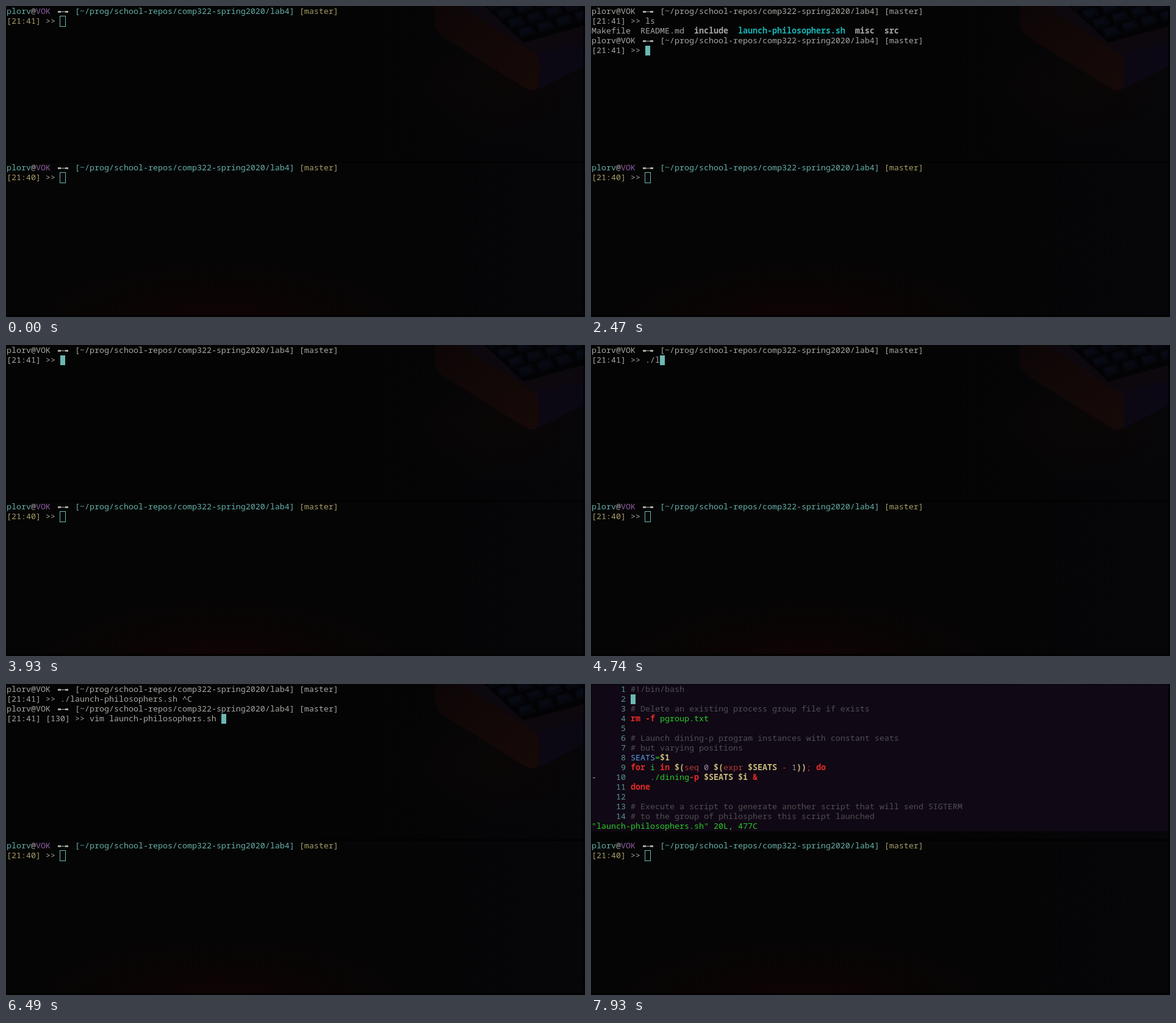
An HTML page that plays this animation: 949 px wide and 509 px high, repeating every 8 s.

```html
<!DOCTYPE html>
<html lang="en">
<head>
<meta charset="utf-8">
<title>Terminal session</title>
<style>
html, body { margin: 0; width: 949px; height: 509px; overflow: hidden; background: #040404; }
svg { display: block; }
text { font: 300 13.333px "Noto Sans Mono", "Liberation Mono", monospace; white-space: pre; }
.b { font-weight: 700; }
</style>
</head>
<body>
<svg width="949" height="509" viewBox="0 0 949 509">
  <defs>
    <radialGradient id="red"><stop stop-color="#110304"/><stop offset=".5" stop-color="#0b0404" stop-opacity=".6"/><stop offset="1" stop-color="#060505" stop-opacity="0"/></radialGradient>
    <radialGradient id="glow"><stop stop-color="#0a0606"/><stop offset="1" stop-color="#0a0606" stop-opacity="0"/></radialGradient>
    <linearGradient id="room"><stop offset=".5" stop-color="#050507" stop-opacity="0"/><stop offset="1" stop-color="#060609"/></linearGradient>
    <linearGradient id="side" x2="1" y2="1"><stop stop-color="#0d0606"/><stop offset="1" stop-color="#160a08"/></linearGradient>
    <linearGradient id="front"><stop stop-color="#0e0814"/><stop offset="1" stop-color="#0b0713"/></linearGradient>
  </defs>
  <rect width="949" height="509" fill="#040404"/>
  <rect y="256" width="949" height="249" fill="#050505"/>
  <rect width="949" height="509" fill="url(#room)"/>
  <ellipse cx="350" cy="520" rx="420" ry="140" fill="url(#red)"/>
  <ellipse cx="810" cy="130" rx="180" ry="100" fill="url(#glow)"/>
  <path d="M735 0H949V97L874 136L858 80Z" fill="url(#front)"/>
  <path d="M703 0H745L860 70Q875 80 874 100V128Q870 143 854 136L718 52Q703 42 703 26Z" fill="url(#side)"/>
  <path d="M745 0H949V58L866 78Z" fill="#0d080d"/>
  <path d="M784 0H949V32L848 60Z" fill="#030305"/>
  <g id="keys"></g>
  <path d="M0 255.5H949M0 507H949M947.5 0V509" stroke="#010101" stroke-width="2"/>
  <g id="top"></g>
  <g id="bottom"></g>
</svg>
<script>
const LOOP = 8000, CELL = 8, ROW = 16;
const GREY = '#a6a6a2', TEAL = '#66afa8', PURPLE = '#8c5ca2', OLIVE = '#a69d68',
  CYAN = '#18b2b2', GREEN = '#28cc28', RED = '#e32b26', KHAKI = '#c9bb79',
  DIM = '#514e53', NUM = '#5a9494', BLUE = '#5c9ee6', CURSOR = '#6cb8b2',
  DARKRED = '#b33a35', MAUVE = '#a08aa0';
const USER = 'plorv', HOST = 'VOK', FILE = 'launch-philosophers.sh';
const PATH = '[~/prog/school-repos/comp322-spring2020/lab4]';

const $ = id => document.getElementById(id);
const esc = s => s.replace(/&/g, '&amp;').replace(/</g, '&lt;').replace(/>/g, '&gt;');
const box = (x, y, w, h, fill) => `<rect x="${x}" y="${y}" width="${w}" height="${h}" fill="${fill}"/>`;

// A line is a string or a list of [text, colour, bold] parts.
function line(parts, row, top = 1) {
  if (typeof parts === 'string') parts = [[parts, GREY]];
  const spans = parts.map(([s, c, b]) =>
    `<tspan fill="${c}"${b ? ' class="b"' : ''}>${esc(s)}</tspan>`).join('');
  return `<text x="1" y="${top + row * ROW + 12}">${spans}</text>`;
}

function prompt(row, top, colored) {
  const y = top + row * ROW + 8, pick = c => colored ? c : GREY;
  return line([[USER, pick(TEAL)], ['@', GREY], [HOST, pick(PURPLE)], ['     ', GREY],
    [PATH, pick(TEAL)], [' ', GREY], ['[master]', pick(OLIVE)]], row, top) +
    box(85, y - 1, 5, 3, GREY) + box(90, y, 7, 1, GREY) + box(97, y - 1, 5, 3, GREY);
}

const solid = (col, row) => box(1 + col * CELL, 1 + row * ROW, CELL, ROW, CURSOR);
const hollow = (col, row, top) =>
  `<rect x="${col * CELL + .5}" y="${top + row * ROW - .5}" width="9" height="17" fill="none" stroke="${CURSOR}"/>`;

function idlePane(top, clock) {
  return prompt(0, top, true) + line([[`[${clock}]`, OLIVE], [' >>', GREY]], 1, top) + hollow(11, 1, top);
}

const PS = '[21:41] >> ';
const LISTING = [['Makefile  README.md  ', GREY], ['include', GREY, 1], ['  ', GREY],
  [FILE, CYAN, 1], ['  ', GREY], ['misc', GREY, 1], ['  ', GREY], ['src', GREY, 1]];
const GCC = 'gcc -Iinclude -Wall -Wextra -g ';
const BUILD = [GCC + '-g -c src/dining-p.c', GCC + '-o dining-p  dining-p.o -pthread', 'rm dining-p.o'];

// Lines of the shell; null stands for the first prompt line. The cursor ends the last one.
function shell(lines, lit = true) {
  const last = lines.length - 1;
  return lines.map((l, i) => l === null ? prompt(i, 1, false) : line(l, i)).join('') +
    (lit ? solid(lines[last].length, last) : '');
}

const note = s => [[s, DIM]];
const SCRIPT = [
  note('#!/bin/bash'),
  [],
  note('# Delete an existing process group file if exists'),
  [['rm -f', RED, 1], [' pgroup.txt', GREEN]],
  [],
  note('# Launch dining-p program instances with constant seats'),
  note('# but varying positions'),
  [['SEATS', BLUE], ['=', GREEN], ['$1', KHAKI, 1]],
  [['for', RED, 1], [' i ', GREEN], ['in', RED, 1], [' $(', KHAKI, 1], ['seq ', DARKRED], ['0', MAUVE],
    [' $(', KHAKI, 1], ['expr ', DARKRED], ['$SEATS', KHAKI, 1], [' - ', RED], ['1', MAUVE],
    ['))', KHAKI, 1], ['; ', RED], ['do', RED, 1]],
  [['    ./dining', GREEN], ['-p', RED, 1], [' $SEATS $i', KHAKI, 1], [' &', RED, 1]],
  [['done', RED, 1]],
  [],
  note('# Execute a script to generate another script that will send SIGTERM'),
  note('# to the group of philosphers this script launched')
];

function editor(loaded, cursorRow = -1) {
  let out = box(1, 1, 945, 240, '#100814') + line([[`"${FILE}" 20L, 477C`, GREEN]], 14);
  if (!loaded) return out;
  SCRIPT.forEach((parts, i) => {
    const n = String(i + 1).padStart(6);
    out += line([[i === 9 ? '-' : ' ', GREY], [n + ' ', NUM], ...parts], i);
  });
  return out + (cursorRow < 0 ? '' : solid(8, cursorRow));
}

const events = [];
const at = (t, html) => events.push({ t, html });
function type(before, typed) {
  for (const [t, s, lit] of typed) {
    const lines = before.slice();
    lines[lines.length - 1] += s;
    at(t, shell(lines, lit));
  }
}

const first = [null, PS];
const listed = [null, PS + 'ls', LISTING, null, PS];
const making = [null, PS + 'ls', LISTING, null, PS + 'make'];
const broken = [null, `${PS}./${FILE} ^C`, null, '[21:41] [130] >> '];

at(0, idlePane(1, '21:41'));
type(first, [[320, ''], [910, '', false], [1140, 'l'], [1210, 'ls']]);
at(1290, shell([null, PS + 'ls', '']));
at(1340, shell([null, PS + 'ls', LISTING, ''], false));
type(listed, [[1390, ''], [1870, '', false], [2470, ''], [2590, 'm'], [2680, 'ma'], [2770, 'mak'], [2860, 'make']]);
at(3200, shell([...making, BUILD[0], '']));
at(3250, shell([...making, BUILD[0], BUILD[1], '']));
at(3300, shell([...making, ...BUILD, null, PS]));
type(first, [[3930, ''], [4330, '.'], [4490, './'], [4740, './l'], [4840, './la'],
  [4940, `./${FILE} `], [5480, `./${FILE} `, false]]);
type(broken, [[5580, ''], [5890, 'v'], [5960, 'vi'], [6010, 'vim'], [6150, 'vim '], [6300, 'vim l'],
  [6400, 'vim la'], [6490, `vim ${FILE} `], [7030, `vim ${FILE} `, false]]);
at(7070, editor(false));
at(7170, editor(true, 0));
at(7750, editor(true));
at(7890, editor(true, 0));
at(7930, editor(true, 1));

function drawKeys() {
  let out = '';
  for (let j = 3; j >= 0; j--) for (let i = 4; i >= 0; i--) {
    const x = 838 + 31 * i - 17 * j, y = 37 - 9 * i - 15 * j;
    out += `<path d="M${x} ${y}l23 -6l7 14l-24 8z" fill="#06070d"/>` +
      `<path d="M${x + 3} ${y + 2}l17 -5l3 8l-17 5z" fill="#070913"/>`;
  }
  $('keys').innerHTML = out;
}

const start = performance.now();
let shown = null;
function frame(now) {
  const t = Math.max(0, now - start) % LOOP;
  const current = events.findLast(e => e.t <= t);
  if (current !== shown) {
    shown = current;
    $('top').innerHTML = current.html;
  }
  requestAnimationFrame(frame);
}

drawKeys();
$('bottom').innerHTML = idlePane(257, '21:40');
frame(start);
</script>
</body>
</html>
```
